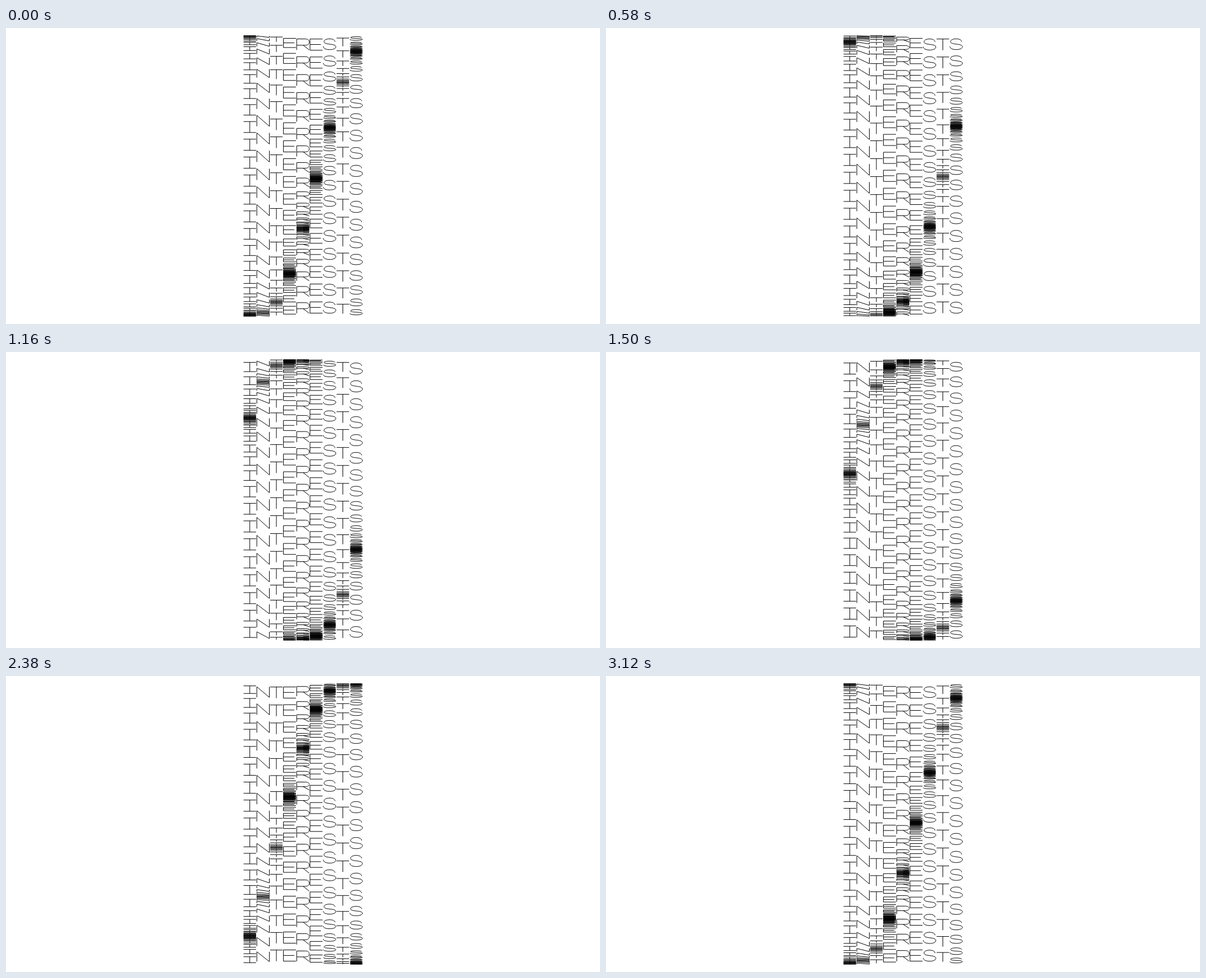
Recreate the animation shown at these times as an HTML page with a canvas. Size 1059 by 529 pixels, loop 3140 ms.

```html
<!DOCTYPE html>
<html lang="en">
<head>
<meta charset="utf-8">
<title>Interests</title>
<style>
  html, body { margin: 0; width: 100%; height: 100%; overflow: hidden; background: #fff; }
  canvas { display: block; }
</style>
</head>
<body>
<canvas id="stage" width="1059" height="529" role="img" aria-label="INTERESTS"></canvas>
<script>
const ctx = document.getElementById('stage').getContext('2d');

const WORD = 'INTERESTS';
const LOOP = 3140, STEP = 20;
const ROWS = 30, TOP = 13.4, HEIGHT = 502;
const LEFT = 423.5, PITCH = 23.7, WIDTH = 22.3;
const CAP_TOP = 0.195, CAP_HEIGHT = 0.625;   // share of a row's height
const START = 0.9738, COLUMN_LAG = 0.0939;   // in turns of the wave
const SLOPE = 1.6, DEPTH = 0.92;

// Hairline capitals in a unit square
const GLYPHS = {
  I: 'M0 0H1M0 1H1M.5 0V1',
  N: 'M0 1V0L1 1V0',
  T: 'M0 0H1M.5 0V1',
  E: 'M1 0H0V1H1M0 .49H.87',
  R: 'M0 1V0H.68C.88 0 1 .1 1 .28C1 .47 .88 .57 .68 .57H0M.52 .57L1 1',
  S: 'M.94 .27C.92 .09 .75 0 .5 0C.24 0 .06 .1 .06 .26C.06 .42 .25 .45 .5 .49' +
     'C.78 .53 1 .56 1 .74C1 .9 .78 1 .52 1C.22 1 .01 .91 0 .7'
};
const glyphs = Object.fromEntries(
  Object.entries(GLYPHS).map(([letter, d]) => [letter, new Path2D(d)]));

// Sine with flattened crests
function softSquare(angle) {
  const s = Math.sin(angle);
  return Math.sign(s) * (1 - Math.pow(1 - Math.abs(s), SLOPE));
}

// Row heights of a column whose pinch sits at the given turn, filling HEIGHT
function rowHeights(pinch) {
  const weights = Array.from({ length: ROWS }, (_, row) => {
    const turn = (row + 0.5) / ROWS - pinch;
    return 1 + DEPTH * softSquare(2 * Math.PI * turn - Math.PI / 2);
  });
  const total = weights.reduce((a, b) => a + b);
  return weights.map(w => w * HEIGHT / total);
}

function drawColumn(letter, column, time) {
  const x = LEFT + column * PITCH;
  let y = TOP;
  for (const h of rowHeights(START - column * COLUMN_LAG + time / LOOP)) {
    const path = new Path2D();
    path.addPath(glyphs[letter],
      new DOMMatrix([WIDTH, 0, 0, h * CAP_HEIGHT, x, y + h * CAP_TOP]));
    ctx.stroke(path);
    y += h;
  }
}

function frame() {
  const time = Math.floor(performance.now() % LOOP / STEP) * STEP;
  ctx.fillStyle = '#fff';
  ctx.fillRect(0, 0, 1059, 529);
  ctx.strokeStyle = '#000';
  ctx.lineWidth = 1;
  ctx.miterLimit = 2;
  [...WORD].forEach((letter, column) => drawColumn(letter, column, time));
  requestAnimationFrame(frame);
}
frame();
</script>
</body>
</html>
```
